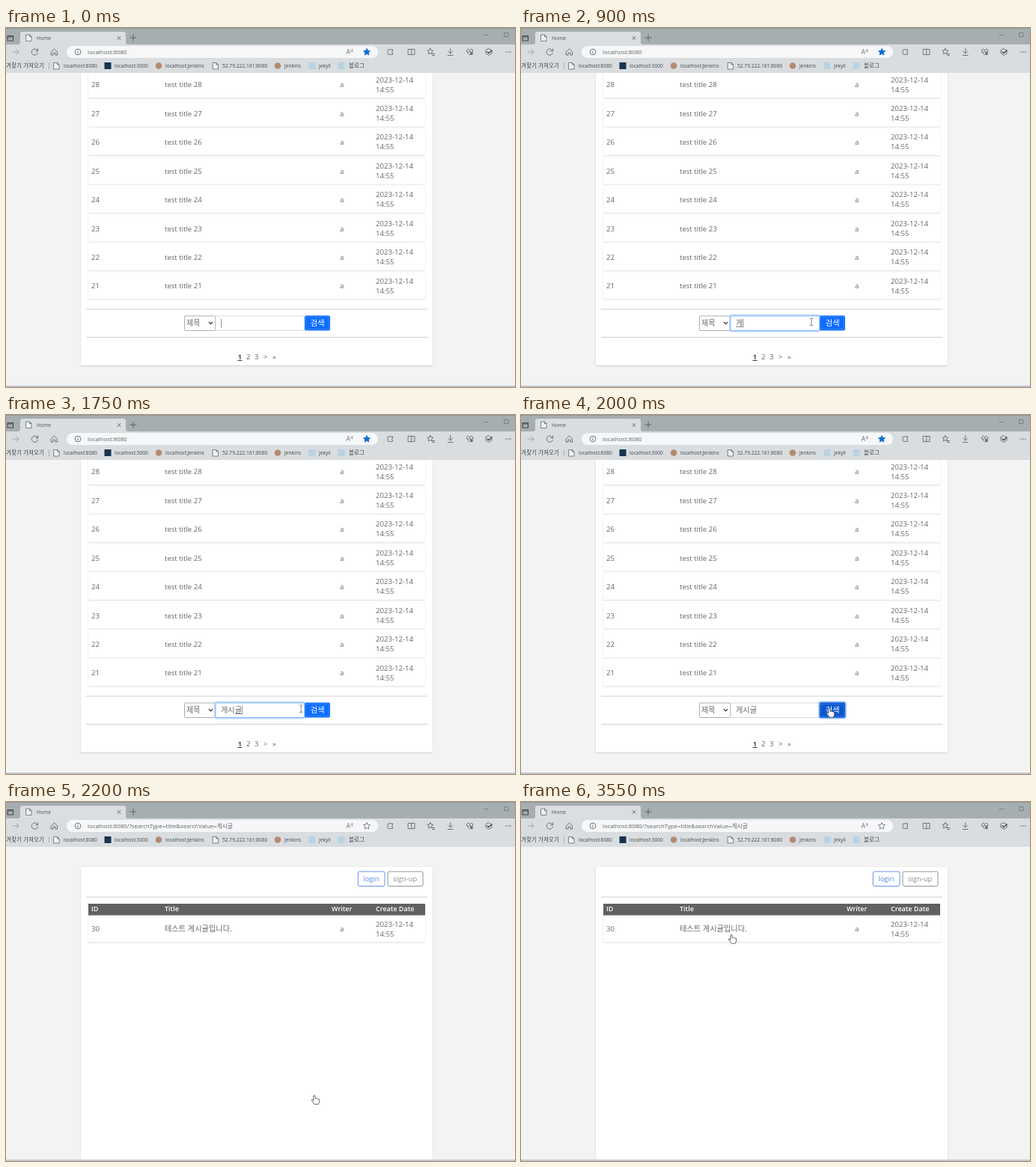
An HTML page for the animation above (3.6 s loop, 680 by 480 pixels).

```html
<!DOCTYPE html>
<html lang="ko">
<head>
<meta charset="utf-8">
<style>
  html, body { margin: 0; width: 100%; height: 100%; overflow: hidden; background: #f3f3f3; }
  svg { display: block; width: 680px; height: 480px; }
  text { font-family: "Open Sans", "Noto Sans CJK KR", sans-serif; white-space: pre; }
</style>
</head>
<body>
<svg id="stage" viewBox="0 0 680 480"></svg>
<script>
const LOOP = 3600, STEP = 50;
const CLICK = 1850, NAVIGATE = 2200;
const INK = '#666', CHROME = '#43484b', ICON = '#62686c';

// Markup helpers
const text = (x, y, s, size = 9.6, fill = INK, extra = '') =>
  `<text x="${x}" y="${y}" font-size="${size}" fill="${fill}" ${extra}>${s}</text>`;
const rect = (x, y, w, h, fill, extra = '') =>
  `<rect x="${x}" y="${y}" width="${w}" height="${h}" fill="${fill}" ${extra}/>`;
const line = (d, color = ICON, width = 0.9, fill = 'none') =>
  `<path d="${d}" fill="${fill}" stroke="${color}" stroke-width="${width}" stroke-linejoin="round" stroke-linecap="round"/>`;
const circle = (x, y, r, fill, stroke = 'none') =>
  `<circle cx="${x}" cy="${y}" r="${r}" fill="${fill}" stroke="${stroke}" stroke-width=".9"/>`;
const group = (id, content) => `<g id="${id}">${content}</g>`;
const rule = y => rect(107, y, 456, 1, '#d0d0d0');
const page = (x, y) => line(`M${x} ${y}h4.5l2.5 2.5v6h-7zM${x + 4.5} ${y}v2.5h2.5`, ICON, 0.8, '#f1f2f3');

function star(cx, cy, r) {
  let d = '';
  for (let i = 0; i < 10; i++) {
    const a = i * Math.PI / 5, q = i % 2 ? r * 0.48 : r;
    d += `${i ? 'L' : 'M'}${(cx + q * Math.sin(a)).toFixed(2)} ${(cy - q * Math.cos(a)).toFixed(2)}`;
  }
  return d + 'z';
}

function tableRow(y, id, title, size) {
  return rect(110, y - 16.5, 450, 33.5, '#fff', 'filter="url(#shadow)"') +
    text(114, y + 3.4, id) + text(212, y + 3.4, title, size) + text(446, y + 3.4, 'a') +
    text(494, y - 3.4, '2023-12-14') + text(494, y + 9.6, '14:55');
}

function browser() {
  const bookmark = (x, s, size = 6.65) => text(x, 53, s, size, CHROME);
  return rect(0, 0, 680, 60, '#d9dde0') + rect(0, 0, 680, 22, '#a6aeb2') + rect(0, 0, 680, 1, '#8f979b') +
    `<path d="M16 22q3 0 3-3v-11q0-3 3-3h135q3 0 3 3v11q0 3 3 3z" fill="#dadee1"/>` +
    line('M2 10.5h7.5v6.5h-7.5zM2 12h7.5', CHROME, 1.1) + page(27, 9) +
    text(41, 15.7, 'Home', 6.7, '#4c5154') +
    line('M149 11.5l4 4m0-4l-4 4M166 13h8m-4-4v8', '#4c5154', 0.8) +
    line('M639 9.5h5M666 6.5h5v5h-5z', '#666d71', 0.7) +
    line('M9 32h8m-3.5-3.5l3.5 3.5l-3.5 3.5', '#9a9fa3') +
    line('M42.3 30.5a4.2 4.2 0 1 0 .2 2.6M42.6 27.8v2.9h-2.9') +
    line('M60.5 31.8l4-3.8l4 3.8v4.3h-2.6v-3h-2.8v3h-2.6z') +
    rect(81, 24, 416, 16, '#f6f7f8', 'rx="8"') +
    circle(96, 32, 3.9, 'none', ICON) + line('M96 31.7v2.2M96 30v.1') +
    '<text id="url" x="109" y="34.6" font-size="7.8" fill="#5f6366"></text>' +
    text(454.5, 35.3, 'A', 8.6, '#6c7275') + line('M461 29q1 1 0 2.4m1.6-3.2q1.6 1.6 0 4', '#6c7275', 0.7) +
    `<path id="star" d="${star(482, 32.2, 4.8)}" stroke-width=".8" stroke-linejoin="round"/>` +
    line('M516.5 30.2v-1.4h-5.4q-1 0-1 1v4.6q0 1 1 1h5.4v-1.4q-2.2-1.9 0-3.8z') +
    line('M537.5 28.4h8.5v7.2h-8.5zM541.7 28.4v7.2') +
    line(star(566.8, 31.5, 4.2)) + line('M569 34.5h3.5m-3 2h3') +
    line('M593.7 27.5v6.5m-2.8-2.8l2.8 2.8l2.8-2.8M590.2 36.5h7') +
    line('M619.5 36l-3.6-3.8q-1.6-3 1.2-4q1.6 0 2.4 1.4q1-1.6 2.6-1.4q2.6 1 1.2 4M617 32h1.7l1-1.6l1.2 3l.8-1.4h2') +
    circle(622, 34.5, 1.8, ICON) +
    line('M645 27.8l4 2v4l-4 2.6l-4-2.6v-4z') + line('M643 32l2 1.6l4-3.6', CHROME, 1.4) +
    [668, 671, 674].map(x => circle(x, 32, 0.7, CHROME)).join('') +
    text(51, 53, '즐겨찾기 가져오기', 7.6, CHROME, 'text-anchor="end"') + rect(57, 46, 0.8, 9, '#a6acb0') +
    page(64, 46.5) + bookmark(77, 'localhost:8080') +
    rect(131.5, 46, 9, 9, '#16334f') + bookmark(145, 'localhost:3000') +
    circle(204, 50.5, 4.3, '#b58a70') + bookmark(213, 'localhost:Jenkins') +
    page(276.5, 46.5) + bookmark(289, '52.79.222.161:8080') +
    circle(363, 50.5, 4.3, '#b58a70') + bookmark(372, 'Jenkins') +
    rect(404.5, 46, 9, 9, '#b9d3e2') + bookmark(418, 'jekyll') +
    rect(443.5, 46, 9, 9, '#b9d3e2') + bookmark(458, '블로그', 7.6);
}

function listPage() {
  let s = rect(100, 60, 470, 391, '#fff', 'filter="url(#shadow)"');
  for (let id = 28; id > 20; id--) s += tableRow(76 + (28 - id) * 38.43, id, `test title ${id}`);
  return s + rule(375.5) + rule(413) +
    rect(238.5, 385, 41, 19.5, '#fff', 'rx="1" stroke="#a2a2a2" stroke-width=".9"') + text(241, 398.4, '제목', 10) +
    line('M271.3 393.5l2.2 2.3l2.2-2.3', '#333', 1.2) +
    rect(279.5, 384.5, 119.5, 20.5, 'none', 'id="inputRing" rx="2" stroke="#bcd7fd" stroke-width="3"') +
    rect(280, 385, 119, 19.5, '#fff', 'id="input" rx="1"') +
    `<text id="typed" x="287" y="398.4" font-size="10.2" fill="${INK}"></text>` +
    rect(0, 399.2, 9, 0.8, INK, 'id="underline"') + rect(0, 389, 0.8, 11.5, '#777', 'id="caret"') +
    rect(398.5, 384, 35, 21, 'none', 'id="buttonRing" rx="2.5" stroke="#8fb9fb" stroke-width="2.4"') +
    rect(399, 384.5, 34, 20, '#0d6efd', 'id="button" rx="2"') +
    rect(400.5, 386.5, 31, 16, 'none', 'stroke="#fff" stroke-width=".8" stroke-dasharray="1 2" opacity=".5"') +
    text(406.8, 398.4, '검색', 10.2, '#fff', 'font-weight="500"') +
    text(309.8, 443.2, '1', 9.6, '#222', 'font-weight="600"') + rect(309.5, 444, 6, 0.9, '#222') +
    text(321, 443.2, '2') + text(332, 443.2, '3') + text(344, 443.2, '&gt;') + text(356, 443.2, '»');
}

function resultPage() {
  const outlined = (x, w, s, color) =>
    rect(x, 93, w, 19.5, '#fff', `rx="2" stroke="${color}" stroke-width=".9"`) + text(x + 7, 106, s, 9.4, color);
  const heading = (x, s) => text(x, 146.2, s, 9, '#fff', 'font-weight="600"');
  return rect(100, 87, 470, 391, '#fff', 'filter="url(#shadow)"') +
    outlined(470.3, 35.7, 'login', '#5584ea') + outlined(510, 47, 'sign-up', '#828b8c') + rule(126.5) +
    tableRow(170, 30, '테스트 게시글입니다.', 10.2) + rect(110, 136, 450, 15.5, '#616161') +
    heading(114, 'ID') + heading(212, 'Title') + heading(435, 'Writer') + heading(494, 'Create Date');
}

// Cursor shapes have their hot spot at 0,0
const cursors =
  group('beam', line('M-2-5q2 0 2 1v8q0 1-2 1M2-5q-2 0-2 1M0 4q0 1 2 1', '#777', 0.9)) +
  group('arrow', line('M0 0v9.3l2.2-2l1.5 3.4l1.5-.7l-1.5-3.2h2.9z', '#444', 0.8, '#fff')) +
  group('hand', line('M-1.2 7v-6q1.1-2 2.2 0v3.4q1.4-.7 2 .3q1.4-.6 1.9.4q1.5-.4 1.7.9v3l-1.3 3.2h-5l-3.9-5q-.3-1.7 1.2-1.2z', '#444', 0.8, '#fff'));

document.getElementById('stage').innerHTML =
  '<defs><filter id="shadow" x="-5%" y="-20%" width="110%" height="140%">' +
  '<feDropShadow dx="0" dy="1" stdDeviation="1.1" flood-opacity=".15"/></filter></defs>' +
  rect(0, 0, 680, 480, '#f3f3f3') + group('list', listPage()) + group('result', resultPage()) +
  browser() + rect(0, 478, 680, 2, '#c6cad1') + group('cursor', cursors);

const $ = id => document.getElementById(id);
const set = (id, attrs) => { for (const k in attrs) $(id).setAttribute(k, attrs[k]); };
const show = (id, on) => set(id, { display: on ? 'inline' : 'none' });
const clamp = v => Math.max(0, Math.min(1, v));

const typing = [[0, ''], [650, 'ㄱ'], [800, '게'], [950, '겟'], [1100, '게시'], [1350, '게식'], [1450, '게시그'], [1600, '게시글']];

// Moves: start, end, target x, target y, easing
const smooth = u => u * u * (3 - 2 * u);
const easeIn = u => u * u;
const easeOut = u => u * (2 - u);
const moves = [
  [1700, 1850, 412, 392, smooth],
  [2750, 3000, 387, 345, easeIn],
  [3000, 3300, 291, 196, u => u],
  [3300, 3425, 272, 181, easeOut],
  [3425, 3550, 281, 177, smooth]
];

function pointer(t) {
  let x = 388, y = 393;
  for (const [start, end, tx, ty, ease] of moves) {
    const k = ease(clamp((t - start) / (end - start)));
    x += (tx - x) * k;
    y += (ty - y) * k;
  }
  return [x, y];
}

function render(t) {
  const done = t >= NAVIGATE;
  show('list', !done);
  show('result', done);
  $('url').textContent = 'localhost:8080' + (done ? '/?searchType=title&searchValue=게시글' : '');
  set('star', done ? { fill: 'none', stroke: ICON } : { fill: '#0f6bd0', stroke: '#0f6bd0' });

  const focus = clamp(t / 150) * (1 - clamp((t - CLICK) / 150));
  const word = typing.filter(([at]) => at <= t).pop()[1];
  const end = 287 + word.length * 9.38;
  set('inputRing', { opacity: focus });
  set('input', { stroke: focus > 0.5 ? '#86b7fe' : '#d3dae4' });
  $('typed').textContent = word;
  set('underline', { x: end - 9.2 });
  show('underline', word && t < CLICK);
  set('caret', { x: end + 0.2 });
  show('caret', t < CLICK && (t < 550 || t >= 650));

  const [x, y] = pointer(t);
  const overButton = x > 399 && !done;
  set('button', { fill: overButton ? '#0b57d0' : '#0d6efd' });
  set('buttonRing', { opacity: clamp((t - CLICK) / 150) });

  const kind = x <= 399 && t < CLICK ? 'beam' : t < 2800 || y < 188 ? 'hand' : 'arrow';
  for (const c of ['beam', 'arrow', 'hand']) show(c, c === kind);
  set('cursor', { transform: `translate(${x.toFixed(1)} ${y.toFixed(1)})` });
  show('cursor', t >= STEP);
}

const origin = performance.now();
function frame() {
  const t = (performance.now() - origin) % LOOP;
  render(Math.floor(t / STEP) * STEP);
  requestAnimationFrame(frame);
}
frame();
</script>
</body>
</html>
```
